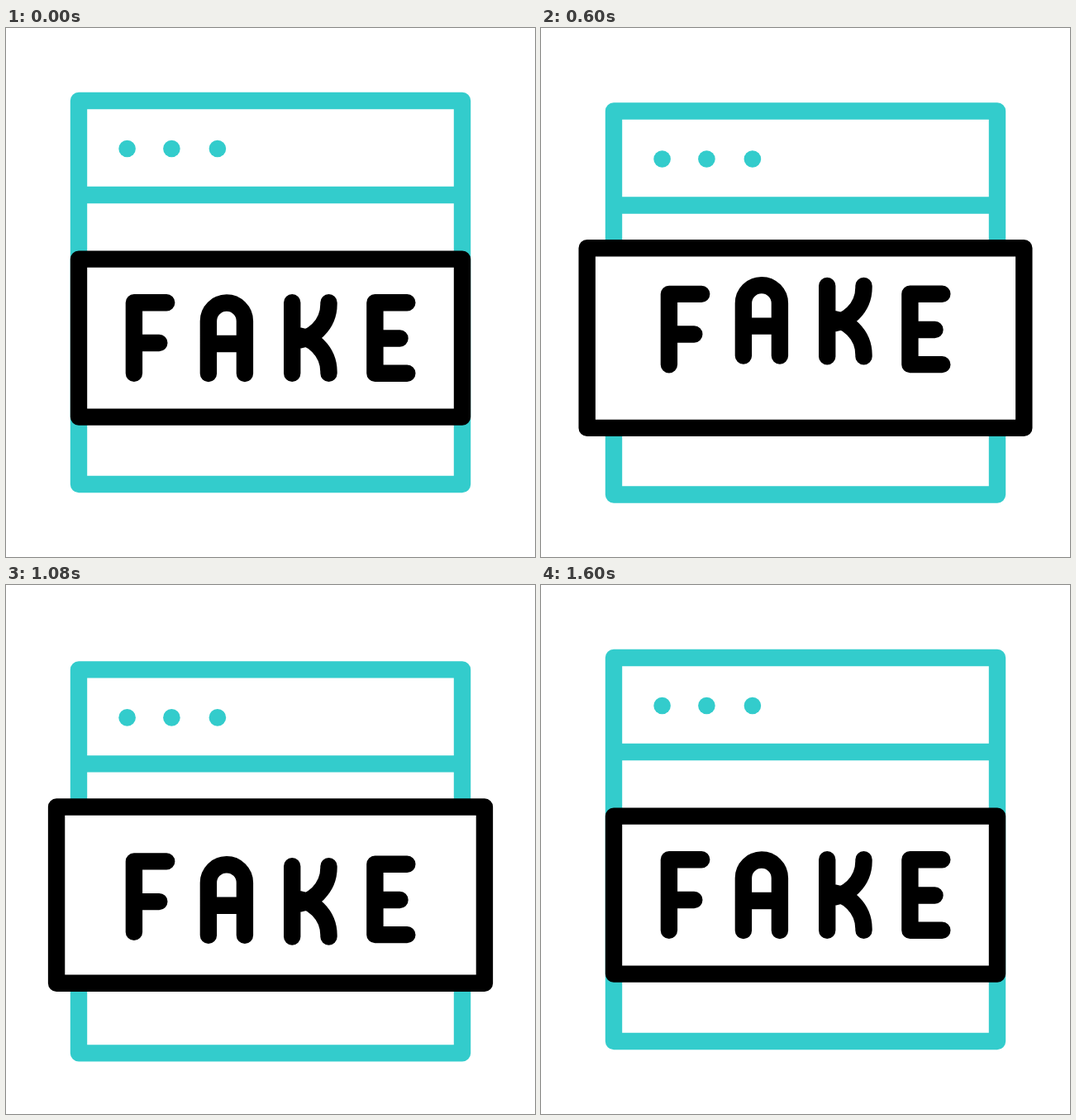
These frames come from a looping animation (640 px wide and 640 px high, 1720 ms). An HTML page:

```html
<!DOCTYPE html>
<html lang="en">
<head>
<meta charset="utf-8">
<title>Fake page</title>
<style>
  html, body { margin: 0; width: 100%; height: 100%; overflow: hidden; background: #fff; }
  svg { display: block; width: 100%; height: 100%; }
  .lines { fill: none; stroke-width: 20.4; stroke-linecap: round; stroke-linejoin: round; }
</style>
</head>
<body>
<svg viewBox="0 0 640 640">
  <g id="page" class="lines" stroke="#3cc">
    <path d="M88 88H552V552H88ZM88 202H552"/>
    <g fill="#3cc" stroke="none">
      <circle cx="146.6" cy="146" r="10.3"/>
      <circle cx="200.4" cy="146" r="10.3"/>
      <circle cx="255.9" cy="146" r="10.3"/>
    </g>
  </g>
  <g class="lines" stroke="#000">
    <rect id="banner" fill="#fff"/>
    <path class="letter" d="M154.9 417.8V332.3H194.2M154.9 381H185.3"/>
    <path class="letter" d="M244.9 418V354.5a22 22 0 0 1 44 0V418M244.9 382H288.9"/>
    <path class="letter" d="M346.2 332.3V417.7M390.5 332.3V334A44.3 44.3 0 0 1 346.2 378.3M390.5 417.7V416A44.3 44.3 0 0 0 346.2 371.7"/>
    <path class="letter" d="M485.3 332.3H446.4V417.7H485.3M446.4 375.5H476.5"/>
  </g>
</svg>
<script>
  const LOOP = 1720, STEP = 40;
  const page = document.getElementById('page');
  const banner = document.getElementById('banner');
  const letters = document.querySelectorAll('.letter');

  // Eased 0..1 progress between two times
  const ease = (t, from, to) => {
    const u = Math.min(1, Math.max(0, (t - from) / (to - from)));
    return u * u * (3 - 2 * u);
  };
  const shiftY = (node, y) => node.setAttribute('transform', `translate(0 ${y})`);

  // Jump up, overshoot below the baseline, settle
  const hop = t => -21.4 * ease(t, 0, 330) + 29.3 * ease(t, 410, 694) - 7.9 * ease(t, 752, 1138);

  function draw(t) {
    shiftY(page, 18 * (ease(t, 265, 795) - ease(t, 928, 1458)));

    const scale = 1 + 0.15 * (ease(t, 140, 690) - ease(t, 909, 1464));
    const w = 464 * scale, h = 191 * scale;
    const box = { x: 320 - w / 2, y: 375.1 - h / 2, width: w, height: h };
    for (const key in box) banner.setAttribute(key, box[key]);

    letters.forEach((letter, i) => shiftY(letter, hop(t - 72 - 121.5 * i)));
  }

  function tick() {
    const t = performance.now() % LOOP;
    draw(Math.floor(t / STEP) * STEP);
    requestAnimationFrame(tick);
  }
  tick();
</script>
</body>
</html>
```
